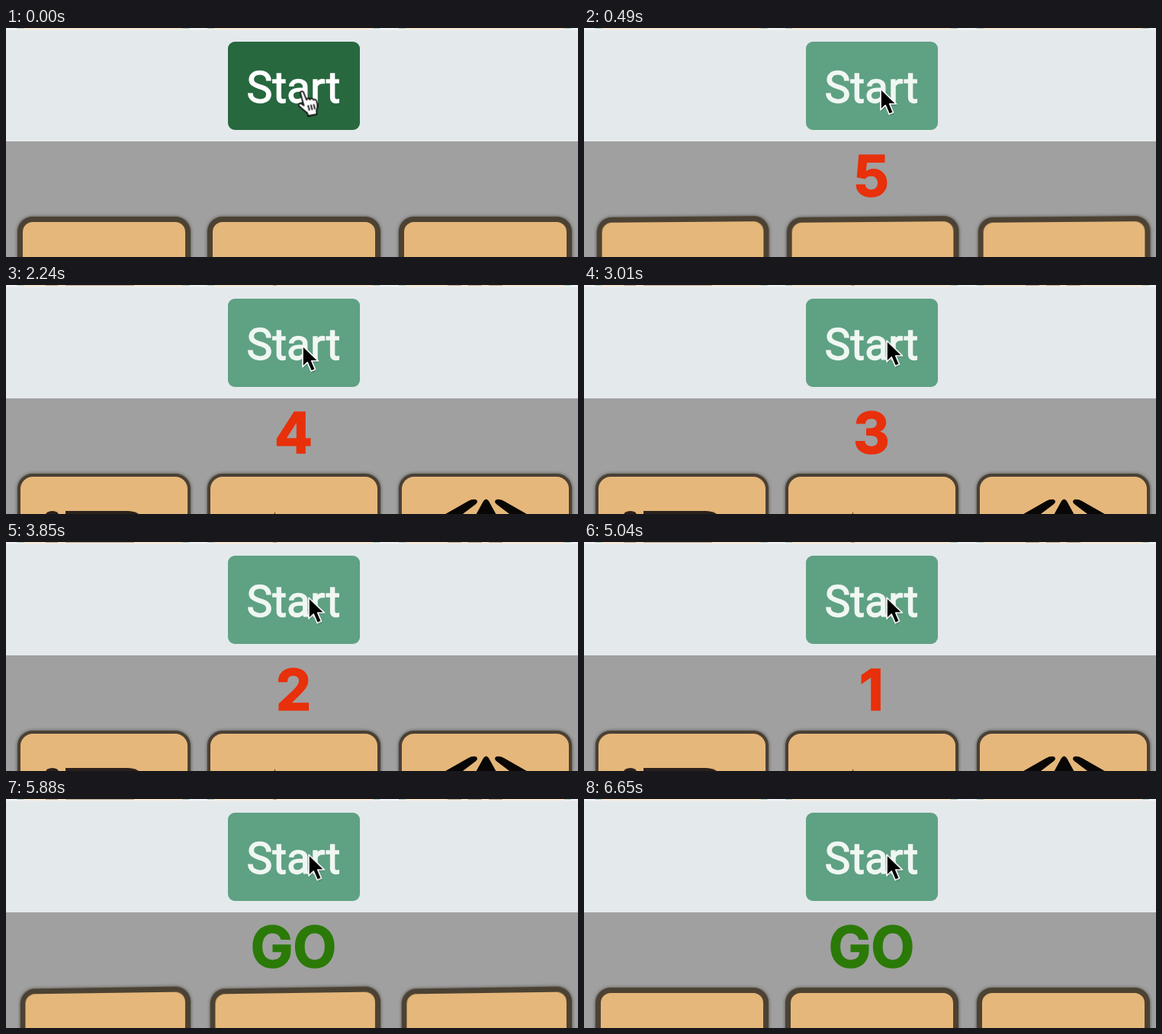
An HTML page that plays this animation: 750x301 px, repeating every 6.72 s.

```html
<!DOCTYPE html>
<html lang="en">
<head>
<meta charset="utf-8">
<title>Memory cards</title>
<style>
  html, body { margin: 0; width: 100%; height: 100%; overflow: hidden; }
  #stage { position: relative; width: 750px; height: 301px; overflow: hidden; background: #a0a0a0; }
  #bar { position: absolute; width: 750px; height: 148.5px; background: #e4e9ec; }
  #start { position: absolute; left: 290.5px; top: 18px; width: 173px; height: 116px; border-radius: 9px; }
  #start, #over, .card { filter: blur(.6px); }
  .card { position: absolute; top: 247.5px; width: 227px; height: 200px; perspective: 1200px; }
  .inner { position: absolute; inset: 0; transform-style: preserve-3d; }
  .face {
    position: absolute; inset: 0; box-sizing: border-box; overflow: hidden;
    border: 7px solid #4c4233; border-radius: 20px; background: #e6b77a;
    box-shadow: 0 0 4px rgba(40, 36, 30, .7); backface-visibility: hidden;
  }
  .front { border: 4px solid #4a4035; transform: rotateY(180deg); }
  .face svg { position: absolute; left: -4px; top: -4px; }
  #over { position: absolute; left: 0; top: 0; }
  .label { font: 400 57px Roboto, sans-serif; text-anchor: middle; stroke-width: 1.3px; }
  .count {
    font: 700 74px Inter, sans-serif; text-anchor: middle; opacity: 0;
    fill: #e8300b; stroke: #e8300b; stroke-width: 1.6px;
  }
  .go { fill: #2b7a08; stroke: #2b7a08; }
</style>
</head>
<body>
<div id="stage">
  <div id="bar"></div>
  <div id="start"></div>
  <svg id="over" width="750" height="301">
    <rect width="750" height="2.5" fill="#f1f3f3"/>
    <g id="edge"></g>
    <g id="edgeIcons" fill="#b5a998">
      <path d="M52 0h16v1h-16zM78 0h90v1h-90zM350 0h5v1h-5zM579 0h18v1h-18zM606 0h18v1h-18zM633 0h18v1h-18z"/>
    </g>
    <text id="label" class="label" x="377" y="97.5">Start</text>
    <g id="counts"></g>
    <g id="hand" transform="translate(384.5 82.5)" stroke="#111" stroke-width="1.8" stroke-linejoin="round">
      <path fill="#fff" d="M1.5 3C1 .5 4.5-.2 5.6 2.2L9.6 12C10 9.6 13 9.2 14 11.6C15 9.4 18 9.6 18.6 12C20 10.6 22.4 11.4 22.8 14C24.4 19 24.4 22 22.6 25.4L23 31L11.6 33L10.4 29C6.8 26.6 3.6 23.4.2 20.4C-2 18 .2 15.6 2.8 17L6 19.4Z"/>
      <path fill="none" d="M11.5 19l2 7M15.3 18.3l1.7 7M19 17.6l1.5 6.6"/>
    </g>
    <g id="arrow">
      <path d="M0 0V27.6L6.3 21.7L11.2 33.3L16.5 31L11.7 19.8H20.5Z" transform="translate(1 2)"
        fill="#000" opacity=".25"/>
      <path d="M0 0V27.6L6.3 21.7L11.2 33.3L16.5 31L11.7 19.8H20.5Z" fill="#000"
        stroke="#fff" stroke-width="1.6" stroke-linejoin="round"/>
    </g>
  </svg>
</div>
<script>
const LOOP = 6720, CLICK = 460, SECOND = 1000, FLIP = 600;
const GO = CLICK + 5 * SECOND;
const $ = id => document.getElementById(id);

// steps: [time in ms, properties, easing until the next step]
function play(el, steps) {
  const keys = steps.map(([t, props, easing = 'step-end']) => ({ offset: t / LOOP, easing, ...props }));
  keys.push({ ...keys[keys.length - 1], offset: 1 });
  el.animate(keys, { duration: LOOP, iterations: Infinity });
}

function show(el, from, to = LOOP) {
  const steps = from > 0 ? [[0, { opacity: 0 }]] : [];
  steps.push([from, { opacity: 1 }]);
  if (to < LOOP) steps.push([to, { opacity: 0 }]);
  play(el, steps);
}

const icons = [
  '<path d="M36 55Q38 49 46 49Q53 49 55 55V80H36Z"/><path d="M63 49H145Q155 49 162 55V80H63Z"/>',
  '<path d="M87 55L88.5 50L90 55Z" opacity=".6"/>',
  '<path d="M56 56L91 36Q96 33 101 34Q105 36 101 40L80 56Z"/>' +
  '<path d="M173 56L138 36Q133 33 128 34Q124 36 128 40L149 56Z"/>' +
  '<path d="M100 56L111 36Q114.5 31 118 36L129 56Z"/>'
];

[14.5, 264, 515].forEach((x, i) => {
  const card = document.createElement('div');
  card.className = 'card';
  card.style.left = x + 'px';
  card.innerHTML = '<div class="inner"><div class="face"></div><div class="face front">' +
    `<svg width="228" height="200" fill="${i ? '#080706' : '#2b211c'}">${icons[i]}</svg></div></div>`;
  $('stage').append(card);

  const turn = deg => ({ transform: `rotateY(${deg}deg)` });
  play(card.firstChild, [
    [0, turn(0)],
    [CLICK, turn(0), 'ease'],
    [CLICK + FLIP, turn(-180)],
    [GO, turn(-180), 'ease'],
    [GO + FLIP, turn(0)]
  ]);

  $('edge').innerHTML += `<rect x="${x}" width="226" height="1" fill="#a9c8bc"/>` +
    `<rect x="${x + 9}" width="208" height="1.6" fill="#fae3c8"/>`;
});
$('stage').append($('over'));

['5', '4', '3', '2', '1', 'GO'].forEach((word, i) => {
  const last = word === 'GO';
  const text = document.createElementNS('http://www.w3.org/2000/svg', 'text');
  text.setAttribute('class', last ? 'count go' : 'count');
  text.setAttribute('x', 377);
  text.setAttribute('y', 221);
  text.textContent = word;
  $('counts').append(text);
  const from = CLICK + i * SECOND;
  show(text, from, last ? LOOP : from + SECOND);
});

const ink = color => ({ fill: color, stroke: color });
play($('start'), [[0, { backgroundColor: '#27683f' }], [CLICK, { backgroundColor: '#5fa183' }]]);
play($('label'), [[0, ink('#fff')], [CLICK, ink('#f0f7f3')]]);
show($('edgeIcons'), 1190, 5950);
show($('hand'), 0, CLICK);

const at = (x, y) => ({ transform: `translate(${x}px, ${y}px)` });
show($('arrow'), CLICK);
play($('arrow'), [
  [0, at(389, 80)],
  [2700, at(389, 80), 'ease-in-out'],
  [3000, at(397, 73.2)]
]);
</script>
</body>
</html>
```
